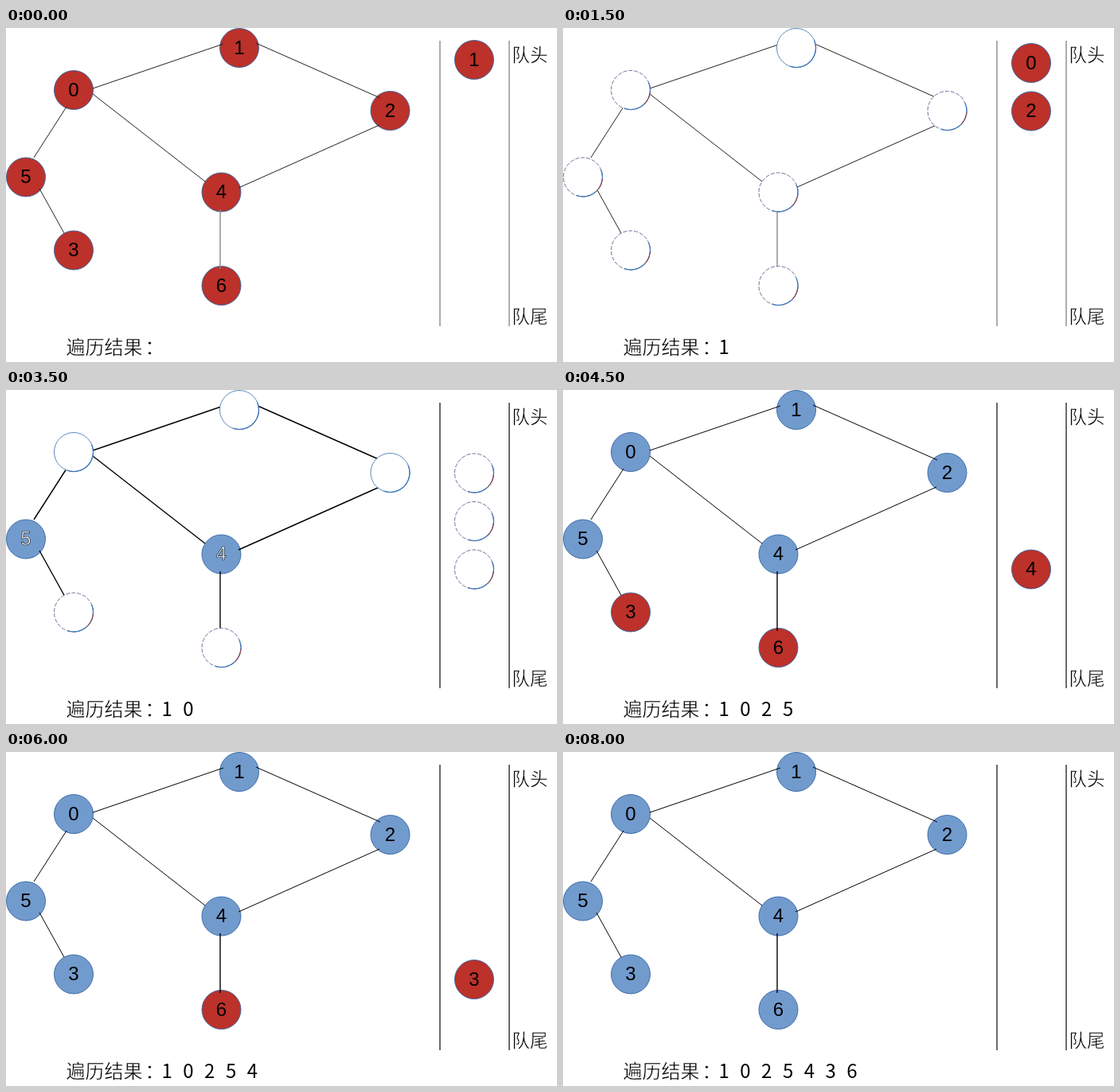
An HTML page with a canvas that plays this animation: 692 px wide and 420 px high, repeating every 8.5 s.

```html
<!DOCTYPE html>
<html lang="zh-CN">
<head>
<meta charset="utf-8">
<style>
  html, body { margin: 0; width: 692px; height: 420px; overflow: hidden; background: #fff; }
  canvas { display: block; }
</style>
</head>
<body>
<canvas id="stage" width="692" height="420"></canvas>
<script>
const ctx = document.getElementById('stage').getContext('2d');
const RED = '#bc312a', BLUE = '#729bcd', EDGE = '#3465a4';
const STEP = 500, R = 24.5, ROOT = 1;
const DARK = 7; // the step that repaints everything with darker lines
const CJK = '"Noto Sans CJK SC", "Noto Sans CJK", sans-serif';

const nodes = [[85, 78], [293, 25], [482.5, 104], [85, 279.5], [270.5, 206.5], [25, 187.5], [270.5, 324]];
const links = [
  { ids: [0, 1], ends: [109, 76, 273, 20] },
  { ids: [1, 2], ends: [314, 19, 470, 88] },
  { ids: [0, 5], ends: [76, 99, 35, 163] },
  { ids: [0, 4], ends: [109, 83, 250, 193] },
  { ids: [2, 4], ends: [469, 122, 292, 201] },
  { ids: [5, 3], ends: [42, 202, 73, 258] },
  { ids: [4, 6], ends: [269, 228, 269, 303] }
];

// Breadth-first search, recorded as one state per step
function search() {
  const order = [ROOT], steps = [];
  let visited = 0, printed = 0;
  const save = (fresh, phase) =>
    steps.push({ visited, printed, queued: order.length, fresh, phase });

  save([], 'plain');
  visited = 1;
  save([], 'plain');
  while (printed < order.length) {
    const id = order[printed++];
    save([], 'plain');
    const fresh = links.filter(l => l.ids.includes(id))
      .map(l => l.ids[0] === id ? l.ids[1] : l.ids[0])
      .filter(n => !order.includes(n));
    if (!fresh.length) continue;
    order.push(...fresh);
    save(fresh, 'enqueue');
    visited = order.length;
    save(fresh, 'mark');
  }
  return { order, steps };
}
const { order, steps } = search();

function stroke(color, width) {
  ctx.strokeStyle = color;
  ctx.lineWidth = width;
  ctx.stroke();
}

function arc(x, y, from = 0, to = Math.PI * 2) {
  ctx.beginPath();
  ctx.arc(x, y, R, from, to);
}

function disc(x, y, label, fill, hollow) {
  arc(x, y);
  ctx.fillStyle = fill;
  ctx.fill();
  stroke(EDGE, 0.9);
  const base = Math.round(y + 7.7);
  ctx.font = '24px "Liberation Sans", Arial, sans-serif';
  ctx.textAlign = 'center';
  ctx.fillStyle = hollow ? '#fff' : '#000';
  ctx.fillText(label, x, base);
  if (hollow) {
    ctx.strokeStyle = '#222';
    ctx.lineWidth = 0.7;
    ctx.strokeText(label, x, base);
  }
}

// Leftover outline of a disc: broken when it was red, solid when blue
function ring(x, y, red) {
  arc(x, y);
  ctx.fillStyle = '#fff';
  ctx.fill();
  if (red) ctx.setLineDash([5, 2]);
  stroke(red ? '#5c6490' : '#4a7cb8', 0.9);
  ctx.setLineDash([]);
  arc(x, y, -0.4, 1.9);
  stroke('#3f76b8', 1.3);
  if (!red) return;
  arc(x, y, 0.1, 0.8);
  stroke(RED, 0.9);
}

function line([x1, y1, x2, y2], color, width) {
  ctx.beginPath();
  ctx.moveTo(x1, y1);
  ctx.lineTo(x2, y2);
  stroke(color, width);
}

function text(str, x, y, size, thin) {
  ctx.font = '300 ' + size + 'px ' + CJK;
  ctx.textAlign = 'left';
  ctx.fillStyle = '#000';
  ctx.fillText(str, x, y);
  if (!thin) return;
  ctx.strokeStyle = '#fff';
  ctx.lineWidth = 0.5;
  ctx.strokeText(str, x, y);
}

const slotY = (k, i) => i ? Math.min(44 + 60.5 * Math.max(k - 1, 0), 342) : 40;

function draw(i) {
  const { visited, printed, queued, fresh, phase } = steps[i];
  const faded = phase !== 'plain', late = i >= DARK;
  const isBlue = n => order.indexOf(n) < visited;
  const isRing = n => faded && !(phase === 'mark' && fresh.includes(n));

  ctx.fillStyle = '#fff';
  ctx.fillRect(0, 0, 692, 420);

  nodes.forEach(([x, y], n) => {
    if (!isRing(n)) disc(x, y, n, isBlue(n) ? BLUE : RED, faded);
  });
  for (const { ends } of links) {
    const upright = ends[0] === ends[2];
    const width = upright || (late && faded) ? 1.4 : 1;
    line(ends, late ? '#000' : upright ? '#888' : '#222', width);
  }
  nodes.forEach(([x, y], n) => {
    if (isRing(n)) ring(x, y, !isBlue(n));
  });

  for (const x of [545, 632]) line([x, 16, x, 375], late ? '#444' : '#999', 1.6);

  for (let k = printed; k < queued; k++) {
    const n = order[k], y = slotY(k, i);
    if (faded && (i === DARK || !fresh.includes(n))) ring(588, y, true);
    else disc(588, y, n, RED);
  }

  text('队头', 635.5, 42, 22.5, true);
  text('队尾', 635.5, 370.5, 22.5, true);
  text('遍历结果', 75.5, 409.5, 24, true);
  text('：', 174.5, 409.5, 24, true);
  for (let k = 0; k < printed; k++) text(order[k], 195.5 + k * 26.8, 410, 24);
}

const start = performance.now();
function tick() {
  const t = (performance.now() - start) % (STEP * steps.length);
  draw(Math.floor(t / STEP));
  requestAnimationFrame(tick);
}
tick();
</script>
</body>
</html>
```
